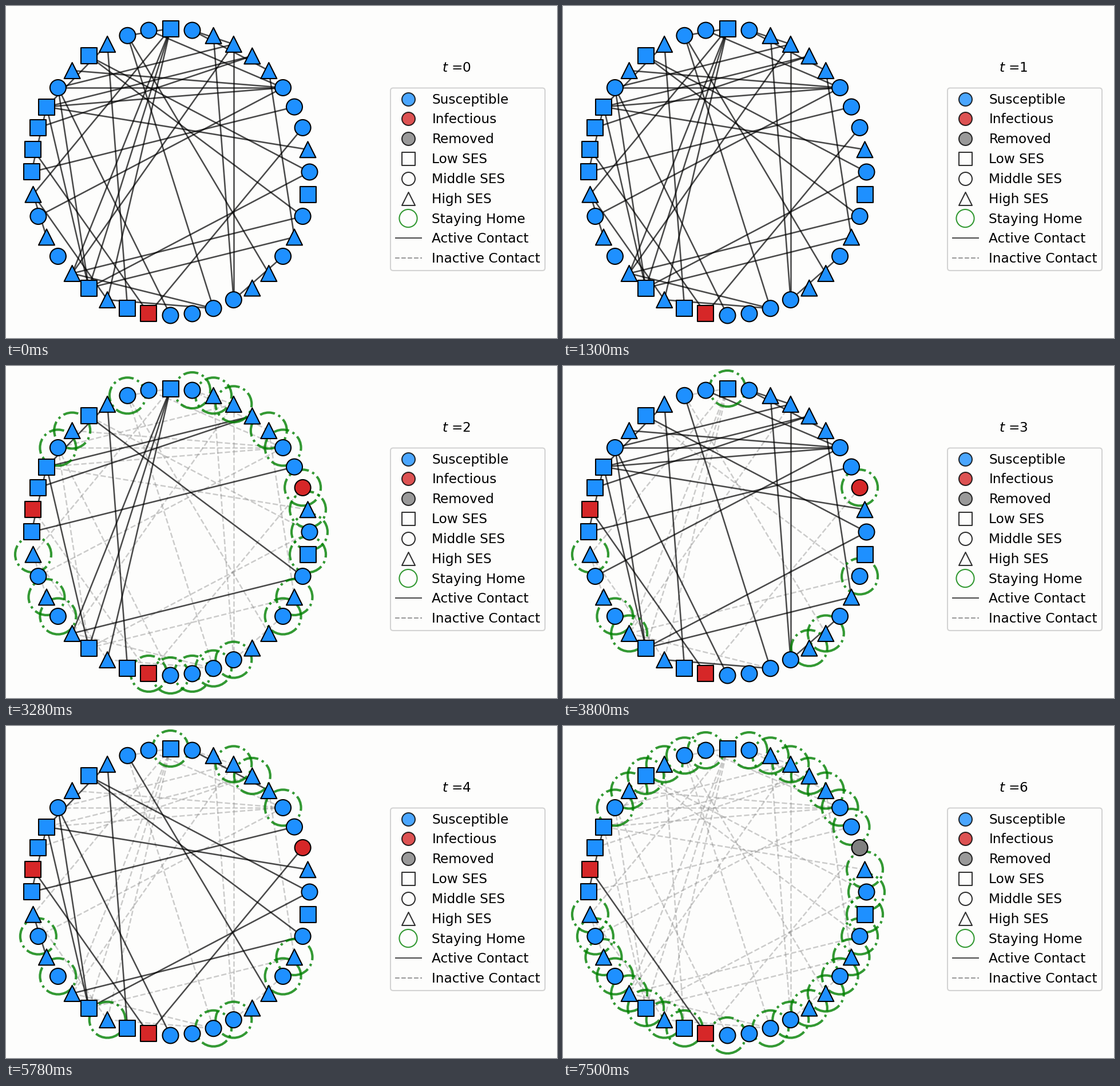
A matplotlib script for the animation above (8 s loop, 963 by 581 pixels).

```python
from itertools import pairwise

import numpy as np
import matplotlib.pyplot as plt
from matplotlib.animation import FuncAnimation
from matplotlib.collections import LineCollection
from matplotlib.patches import FancyBboxPatch

W, H, DPI = 963, 581, 64
PT = 72 / DPI  # points per pixel
BLUE, RED, GRAY = "#1e90ff", "#d62728", "#808080"
BACK = "#fdfdfc"
FONT = dict(family="DejaVu Sans", fontsize=23.2 * PT)
THIN = 2.08 * PT
INTERVAL, LOOP, DAY = 100, 8000, 1250

# People run counterclockwise from the right
N = 40
EVERYONE = set(range(N))
ANGLE = 2 * np.pi * np.arange(N) / N
POS = np.column_stack([287.5 + 243 * np.cos(ANGLE),
                       290.5 - 251 * np.sin(ANGLE)])
LOW = {10, 14, *range(17, 21), 26, 28, 29, 39}
HIGH = {1, *range(5, 9), 13, 15, *range(21, 28, 2), 34, 35, 37}
GROUPS = {"s": LOW, "^": HIGH, "o": EVERYONE - LOW - HIGH}

# Each chain links every person to the next one in it
CHAINS = [
    (2, 29, 19), (3, 20, 17, 6, 18), (1, 17, 13, 28), (11, 4, 15),
    (22, 4, 16, 30), (4, 17, 26, 10, 12, 35), (8, 33, 36),
    (33, 7, 9, 5, 37, 26, 0, 14, 38, 25, 10, 21, 23),
    (26, 16, 7, 25, 32, 12), (32, 27, 21), (10, 27),
]
CONTACTS = [sorted(pair) for chain in CHAINS for pair in pairwise(chain)]

INFECTED_ON = {29: 0, 2: 2, 19: 2}
REMOVED_ON = {2: 6}
WORKERS = set(range(17, 21))  # never stay home
HERMIT = {24}                 # stays home from day 2 on
HOME = [
    set(),
    set(),
    EVERYONE - WORKERS - {3, 6, 10, 11, 13, 14, 22, *range(25, 29), 34, 35, 38},
    HERMIT | {2, 10, 21, 25, 34, 35, 38},
    HERMIT | {4, 6, 7, 10, 22, 27, 32, 33, 36, 37},
    HERMIT | {6, 8, 13, 34, 35},
    EVERYONE - WORKERS - {2, 10, 29, 31},
]


def area(radius):
    """Scatter size of a marker with the given pixel radius."""
    return (2 * radius * PT) ** 2


def state_color(person, day):
    if day >= REMOVED_ON.get(person, N):
        return GRAY
    return RED if day >= INFECTED_ON.get(person, N) else BLUE


def draw_box():
    ax.add_patch(FancyBboxPatch(
        (672, 143.5), 270, 319.5, boxstyle="round,pad=0,rounding_size=4.6",
        fc="none", ec="#cccccc", alpha=0.85, lw=THIN))


def draw_legend():
    draw_box()
    rows = [
        ("Susceptible", "o", BLUE), ("Infectious", "o", RED),
        ("Removed", "o", GRAY), ("Low SES", "s", BACK),
        ("Middle SES", "o", BACK), ("High SES", "^", BACK),
        ("Staying Home", "ring", "green"), ("Active Contact", "-", "black"),
        ("Inactive Contact", "--", "gray"),
    ]
    for k, (label, style, color) in enumerate(rows):
        y = 162.5 + 34.85 * k
        ax.text(744.3, y + 8, label, **FONT)
        if style == "ring":
            ax.scatter(703, y, s=area(15.6), facecolors="none",
                       edgecolors=color, linewidths=THIN, alpha=0.8)
        elif style in ("-", "--"):
            ax.plot([680, 727], [y, y], style, color=color, lw=THIN,
                    alpha=0.7 if style == "-" else 0.8, solid_capstyle="butt")
        else:
            ax.scatter(703, y, s=area(11.5), marker=style, facecolors=color,
                       edgecolors="black", linewidths=THIN, alpha=0.8)


fig = plt.figure(figsize=(W / DPI, H / DPI), dpi=DPI, facecolor=BACK)
ax = fig.add_axes([0, 0, 1, 1])
ax.set_xlim(0, W)
ax.set_ylim(H, 0)
ax.axis("off")

inactive = ax.add_collection(LineCollection(
    [], colors="gray", linewidths=2.5 * PT, linestyles="--", alpha=0.4,
    zorder=1))
active = ax.add_collection(LineCollection(
    [], colors="black", linewidths=2.6 * PT, alpha=0.7, zorder=1.1))
rings = ax.scatter([], [], s=area(31.5), facecolors="none", edgecolors="green",
                   linewidths=2 * THIN, linestyles="-.", alpha=0.8, zorder=2)
dots = {}
for marker, group in GROUPS.items():
    people = sorted(group)
    dots[marker] = people, ax.scatter(
        *POS[people].T, s=area(14), marker=marker, edgecolors="black",
        linewidths=THIN, zorder=3)
draw_legend()
clock = ax.text(762, 114.6, "", **FONT)


def update(frame):
    day = frame * INTERVAL // DAY
    home = HOME[day]
    gone = {p for p, start in REMOVED_ON.items() if day >= start}
    apart = home | gone
    lines = {True: [], False: []}
    for pair in CONTACTS:
        lines[apart.isdisjoint(pair)].append(POS[pair])
    active.set_segments(lines[True])
    inactive.set_segments(lines[False])
    rings.set_visible(bool(home))
    rings.set_offsets(POS[sorted(home)])
    for people, marks in dots.values():
        marks.set_facecolor([state_color(p, day) for p in people])
    clock.set_text(rf"$\mathit{{t}}$ ={day}")


anim = FuncAnimation(fig, update, frames=LOOP // INTERVAL, interval=INTERVAL,
                     init_func=lambda: update(0), repeat=True, repeat_delay=0)
plt.show()
```
